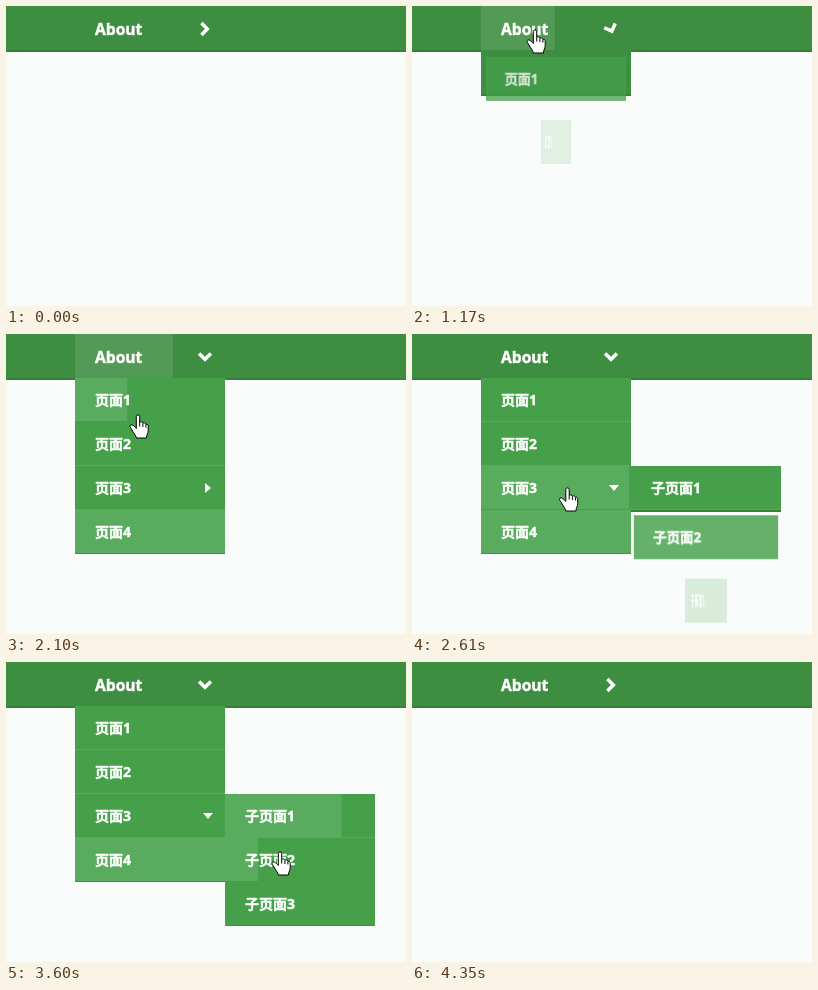
An HTML page that plays this animation: 400 px wide and 300 px high, repeating every 5.01 s.

```html
<!DOCTYPE html>
<html lang="zh-CN">
<head>
<meta charset="utf-8">
<title>Dropdown menu</title>
<style>
  html, body { margin: 0; width: 100%; height: 100%; overflow: hidden; background: #f9fcfb; }
  body { position: relative; color: #fff; font: bold 14px/44px "Open Sans", "Noto Sans CJK SC", "Noto Sans CJK", sans-serif; }
  div, span, svg { position: absolute; }
  svg { overflow: visible; width: 1px; height: 1px; }
  span { white-space: nowrap; left: 20px; -webkit-text-stroke: .45px #fff; }
  .bar, .menu { background: #3e8e41; height: 44px; border-bottom: 2px solid #388039; }
  .bar { width: 400px; }
  .about, .menu, .item { width: 150px; }
  .about { left: 69px; height: 44px; }
  .about span { font-size: 15.6px; line-height: 46px; }
  .item { height: 43px; background: #45a049; border-bottom: 1px solid rgba(255, 255, 255, .1); }
  .item:last-child { border-color: rgba(0, 0, 0, .1); }
  .item.hovered { border-color: transparent; }
  .glow { width: 100%; height: 100%; background: rgba(255, 255, 255, .11); transform-origin: left; }
  .pointer { fill: #fff; stroke: #000; }
</style>
</head>
<body>
<div class="bar"></div>
<div class="about"><div class="glow"></div><span>About</span></div>
<svg style="left:199px;top:22.5px"><path id="chevron" d="M-3.6-5.9L2.3 0-3.6 5.9" fill="none" stroke="#fff" stroke-width="3.5"/></svg>
<svg class="pointer" id="arrow"><path d="M.5 .5V16.2L4.2 12.8 6.6 18.3 9 17.3 6.6 11.8H11.5Z"/></svg>
<svg class="pointer" id="hand">
  <path d="M-1.7 1.8C-1.7-.1 1.7-.1 1.7 1.8V8C2.5 6.8 4.7 7.2 4.9 8.8 5.8 7.9 7.7 8.3 7.9 10 9.3 9.3 10.3 10.3 10.2 12V16C10.2 19 8.6 20 8.4 23.5H-1.6C-2 21-4.5 18.6-6 15.5-7 13.6-8.6 12-7.8 11-6.6 9.6-4 11-1.7 14Z"/>
  <path d="M1.7 8V12M4.9 9V12.5M7.9 10.3V13"/>
</svg>
<script>
const LOOP = 5010, STEP = 30;
const OPEN = 1050, CLOSE = 4080;
const FLIP = 350, STAGGER = 145, HOVER = 400;
const $ = selector => document.querySelector(selector);
const clamp = x => Math.min(1, Math.max(0, x));
const easeOut = x => 1 - (1 - clamp(x)) ** 2;

// cubic-bezier(.42, 0, .58, 1)
function ease(x) {
  x = clamp(x);
  let lo = 0, hi = 1, u;
  for (let i = 0; i < 20; i++) {
    u = (lo + hi) / 2;
    const bx = 3 * u * (1 - u) * (0.42 * (1 - u) + 0.58 * u) + u ** 3;
    if (bx < x) lo = u; else hi = u;
  }
  return u * u * (3 - 2 * u);
}

function buildMenu(x, y, start, labels) {
  const root = document.createElement('div');
  root.className = 'menu';
  root.style.cssText = `left:${x}px;top:${y}px`;
  root.innerHTML = labels.map((label, i) =>
    `<div class="item" style="top:${i * 44}px"><div class="glow"></div><span>${label}</span></div>`).join('');
  $('#arrow').before(root);
  return { root, start, items: [...root.children] };
}

const menu = buildMenu(69, 44, 937, ['页面1', '页面2', '页面3', '页面4']);
const submenu = buildMenu(219, 132, 2217, ['子页面1', '子页面2', '子页面3']);
menu.items[2].insertAdjacentHTML('beforeend',
  '<svg style="left:133px;top:21.5px"><path id="caret" d="M-3-5L3 0-3 5Z" fill="#fff"/></svg>');

// The pointer visits these in turn; entering one leaves the one before.
const visits = [
  [$('.about'), 972],
  [menu.items[0], 1936], [menu.items[1], 2115], [menu.items[2], 2242],
  [submenu.items[0], 3080], [submenu.items[1], 3470], [submenu.items[2], 3680]
];

// Pointer moves: start, duration, x, y
const moves = [
  [1050, 90, 123, 23.5], [1920, 180, 132, 80.5], [2100, 240, 155.5, 153.5],
  [3060, 540, 274, 189.5], [3600, 180, 274, 243]
];

function hoverAmount(t, enter, leave = Infinity) {
  const peak = ease((Math.min(t, leave) - enter) / HOVER);
  return t > leave && peak > 0 ? peak * (1 - ease((t - leave) / (HOVER * peak))) : peak;
}

function show(element, visible) {
  element.style.display = visible ? 'block' : 'none';
}

function place(pointer, x, y) {
  pointer.style.transform = `translate(${x}px, ${y}px)`;
}

function turn(icon, amount) {
  icon.style.transform = `rotate(${90 * amount}deg)`;
}

function drawMenu({ root, start, items }, t, open) {
  show(root, open && t >= start);
  items.forEach((item, i) => {
    const progress = ease((t - start - i * STAGGER) / FLIP);
    const rest = 1 - progress;
    item.style.opacity = progress;
    item.style.transform = progress === 1 ? 'none'
      : `translateY(${30 * rest}px) rotateY(${90 * rest}deg)`;
  });
}

function drawPointer(t, open) {
  const crossing = t >= 120 && t < 210;
  const waiting = t >= 540 && t < OPEN;
  show($('#arrow'), crossing || waiting);
  show($('#hand'), open);
  if (crossing) {
    const k = (t - 120) / 60;
    place($('#arrow'), 372 - 104 * k, 16 - 22 * k);
  } else if (waiting) {
    place($('#arrow'), 123, -14 + 6 * easeOut((t - 540) / 150));
  }
  let x = 123, y = 8;
  for (const [start, duration, toX, toY] of moves) {
    const k = easeOut((t - start) / duration);
    x += (toX - x) * k;
    y += (toY - y) * k;
  }
  place($('#hand'), x, y);
}

function draw(t) {
  const open = t >= OPEN && t < CLOSE;
  drawMenu(menu, t, open);
  drawMenu(submenu, t, open);
  visits.forEach(([element, enter], i) => {
    const leave = visits[i + 1]?.[1];
    const amount = open ? hoverAmount(t, enter, leave) : 0;
    element.querySelector('.glow').style.transform = `scaleX(${amount})`;
    element.classList.toggle('hovered', t >= enter && !(t >= leave));
  });
  const opening = t < OPEN ? 0 : ease((t - menu.start) / FLIP);
  turn($('#chevron'), opening * (1 - ease((t - 4060) / 300)));
  turn($('#caret'), ease((t - submenu.start) / FLIP));
  drawPointer(t, open);
}

function tick(now) {
  draw(Math.floor((now % LOOP) / STEP) * STEP);
  requestAnimationFrame(tick);
}
draw(0);
requestAnimationFrame(tick);
</script>
</body>
</html>
```
